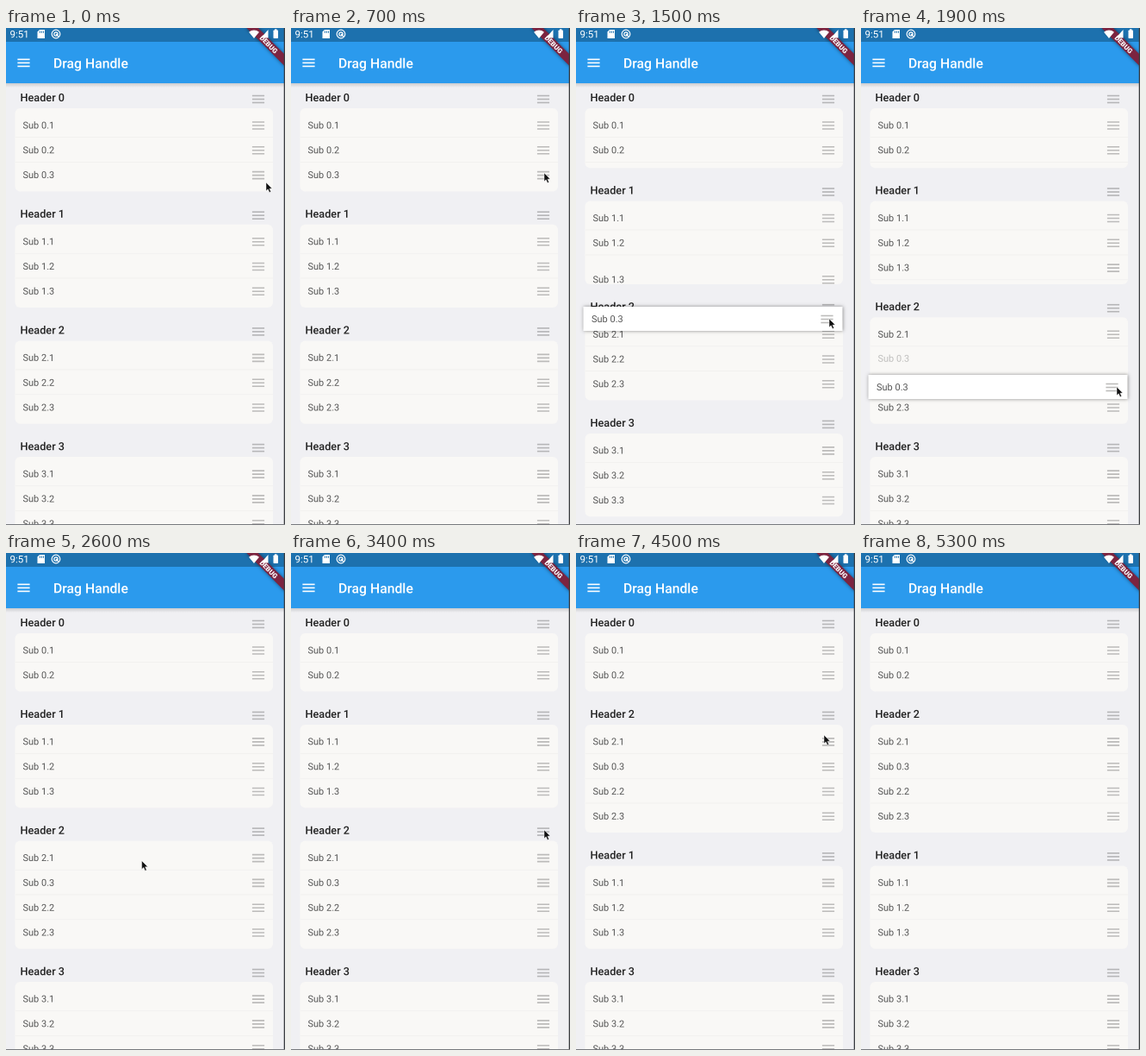
Recreate the animation shown at these times as an HTML page with a canvas. Size 324 by 576 pixels, loop 5600 ms.

```html
<!DOCTYPE html>
<html lang="en">
<head>
<meta charset="utf-8">
<title>Drag Handle</title>
<style>
html, body { margin: 0; width: 100%; height: 100%; overflow: hidden; background: #f0f0f3; }
canvas { display: block; width: 324px; height: 576px; }
</style>
</head>
<body>
<canvas id="stage"></canvas>
<script>
const W = 324, H = 576, LOOP = 5600, TICK = 100;
const ROW = 28.8, DIVIDER = 1.6, GAP = ROW - DIVIDER, FRAME = 48.3;
const canvas = document.getElementById('stage');
const g = canvas.getContext('2d');
const dpr = window.devicePixelRatio || 1;
canvas.width = W * dpr;
canvas.height = H * dpr;

const ramp = (t, start, length) => Math.min(1, Math.max(0, (t - start) / length));

// Pointer moves: start, end, x, y. Dragged things follow the pointer.
const MOVES = [
  [300, 700, 294, 168], [900, 1500, 294, 337], [1500, 1900, 297, 416],
  [2200, 2800, 88, 327], [2800, 3400, 294, 321], [3600, 4000, 290, 223],
  [4000, 4200, 288, 211], [4700, 4900, 165, 131], [5000, 5200, 27, 6]
];

function pointer(t) {
  let x = 302, y = 179;
  for (const [start, end, toX, toY] of MOVES) {
    const p = ramp(t, start, end - start);
    x += (toX - x) * p;
    y += (toY - y) * p;
  }
  return { x, y };
}

// Times at which the dragged row enters each drop slot; the last slot closes behind it.
const SLOTS = [0, 900, 1033, 1233, 1400, 1500, 1633, LOOP];
const slotGap = (t, i) => GAP * (ramp(t, SLOTS[i], 200) - ramp(t, SLOTS[i + 1], 200));

function rect(x, y, w, h, color, r = 0) {
  g.fillStyle = color;
  g.beginPath();
  g.roundRect(x, y, w, h, r);
  g.fill();
}

function poly(color, ...pts) {
  g.fillStyle = color;
  g.beginPath();
  pts.forEach(p => g.lineTo(...p));
  g.closePath();
  g.fill();
}

function text(s, x, y, size, color, weight = 400) {
  g.save();
  g.translate(x, y + size * 0.36);
  g.transform(1, 5e-4, 0, 1, 0, 0); // a hair of skew allows fractional baselines
  g.font = `${weight} ${size}px Roboto, sans-serif`;
  g.fillStyle = color;
  g.fillText(s, 0, 0);
  g.restore();
}

function bars(x, y, color) {
  for (const d of [-4, 0, 4]) rect(x - 7.1, y + d - 0.8, 14.2, 1.6, color);
}

function faded(draw) {
  g.save();
  g.globalAlpha = 0.35;
  draw();
  g.restore();
}

function row(name, x, y, handle = true) {
  text(name, x + 19.5, y, 11, '#555');
  if (handle) bars(x + 293, y + 0.5, '#bcbbba');
}

const sub = (n, count = 3) => Array.from({ length: count }, (_, i) => `Sub ${n}.${i + 1}`);
const sum = rows => rows.reduce((s, r) => s + (typeof r === 'number' ? r : ROW), 0);
const height = rows => FRAME + sum(rows);

function header(n, x, y) {
  text('Header ' + n, x + 16.5, y, 12.7, '#222', 500);
}

function panel(rows, x, y) {
  rect(x + 10.5, y + 12.5, 299.5, sum(rows) + 10, '#f9f8f6', 6);
}

// Rows are names; a number is an open gap of that height.
function list([n, rows], x, y) {
  header(n, x, y);
  bars(x + 293, y + 2, '#b5b5b7');
  g.save();
  panel(rows, x, y);
  g.clip();
  let top = y + 32 - ROW / 2;
  rows.forEach((r, i) => {
    if (typeof r === 'number') {
      if (r > GAP - 1) faded(() => row('Sub 0.3', x, top + r / 2, false));
      top += r;
    } else {
      row(r, x, top + ROW / 2);
      top += ROW;
      if (i < rows.length - 1) rect(x + 10.5, top - 0.8, 299.5, 1, '#f2f1ef');
    }
  });
  g.restore();
}

// Items are lists; a number is space opened for the dragged list.
function stack(...items) {
  let y = 80.5;
  for (const it of items) {
    if (typeof it === 'number') {
      if (it > 130) faded(() => { header(2, 0, y); panel(merged[1], 0, y); });
      y += it;
    } else {
      list(it, 0, y);
      y += height(it[1]);
    }
  }
}

const full = n => [n, sub(n)];
const short = [0, sub(0, 2)];
const merged = [2, ['Sub 2.1', 'Sub 0.3', 'Sub 2.2', 'Sub 2.3']];

function dragRow(t) {
  const { y } = pointer(t);
  const [end0, end1, mid, low, , top2, mid2] = SLOTS.map((_, i) => slotGap(t, i));
  const left = y > 320; // the panel shrinks at once when the row leaves it
  stack(
    [0, [...sub(0, 2), DIVIDER + end0]],
    [1, ['Sub 1.1', mid, 'Sub 1.2', low, 'Sub 1.3', left ? -low : end1]],
    [2, [top2, 'Sub 2.1', mid2, 'Sub 2.2', 'Sub 2.3']],
    full(3), full(4)
  );
  g.save();
  g.shadowColor = 'rgba(0,0,0,.45)';
  g.shadowBlur = 4 * dpr;
  rect(8.5, y - 14, 301, 28, '#fff');
  g.restore();
  row('Sub 0.3', -1.5, y);
}

function dragList(t) {
  const y = pointer(t).y - 5, space = height(merged[1]);
  const gap = space * ramp(t, 3730, 300);
  stack(short, gap, full(1), space - gap, full(3));
  rect(8.5, y - 16, 300, 34, '#f3f3f2');
  rect(284.5, y - 6, 14, 13, '#e6e6e6');
  list(merged, -1.5, y);
}

function content(t) {
  if (t < 1000) stack(...[0, 1, 2, 3].map(full));
  else if (t < 2300) dragRow(t);
  else if (t < 3700) stack(short, full(1), merged, full(3));
  else if (t < 4400) dragList(t);
  else stack(short, merged, full(1), full(3));
}

function ribbon() {
  g.save();
  g.translate(W, 0);
  g.rotate(Math.PI / 4);
  g.shadowColor = 'rgba(0,0,0,.5)';
  g.shadowBlur = 4 * dpr;
  rect(-31.5, 22, 63, 9.5, '#7c2440');
  g.shadowBlur = 0;
  g.textAlign = 'center';
  text('DEBUG', 0, 26.8, 8, '#fff', 900);
  g.restore();
}

function statusIcons() {
  text('9:51', 4.5, 7, 11.6, '#fff');
  poly('#fff', [39, 2], [45, 2], [45, 12], [36.5, 12], [36.5, 4.5]);
  for (const x of [39, 41, 43]) rect(x, 3.5, 1, 2.2, '#1d71ae');
  g.strokeStyle = '#fff';
  g.lineWidth = 1.2;
  g.beginPath();
  g.arc(58, 7, 4.8, 0, 7);
  g.moveTo(60.2, 7);
  g.arc(58, 7, 2.2, 0, 7);
  g.moveTo(58, 7);
  g.lineTo(61.5, 10.5);
  g.stroke();
  g.fillStyle = '#fff';
  g.beginPath();
  g.moveTo(288, 12);
  g.arc(288, 11.5, 9, -Math.PI * 0.73, -Math.PI * 0.27);
  g.fill();
  poly('#fff', [304.5, 2], [304.5, 11.5], [296, 11.5]);
  rect(310.5, 2.5, 5.5, 9.5, '#fff', 0.8);
  rect(312, 1.3, 2.5, 2, '#fff');
}

function chrome() {
  const shade = g.createLinearGradient(0, 64, 0, 69);
  shade.addColorStop(0, 'rgba(0,0,0,.15)');
  shade.addColorStop(1, 'rgba(0,0,0,0)');
  rect(0, 64, W, 5, shade);
  rect(0, 0, W, 64, '#2b9aed');
  rect(0, 0, W, 16, '#1d71ae');
  bars(20.5, 40.4, '#fff');
  text('Drag Handle', 55, 40.7, 15.75, '#fff', 500);
  ribbon();
  statusIcons();
  rect(322.7, 0, 1.3, H, '#3a3c40');
  rect(0, 575, W, 1, '#77797d');
}

function cursor(t) {
  if (t >= 5300) return;
  const { x, y } = pointer(t);
  g.save();
  g.translate(x, y);
  poly('#111', [0, 0], [0, 9.8], [2.2, 7.8], [3.9, 11.6], [5.6, 10.8], [4, 7.2], [7, 7]);
  g.strokeStyle = 'rgba(255,255,255,.75)';
  g.lineWidth = 0.6;
  g.stroke();
  g.restore();
}

const start = performance.now();

function frame() {
  const t = Math.floor((performance.now() - start) % LOOP / TICK) * TICK;
  g.setTransform(dpr, 0, 0, dpr, 0, 0);
  rect(0, 0, W, H, '#f0f0f3');
  content(t);
  chrome();
  cursor(t);
  requestAnimationFrame(frame);
}
frame();
</script>
</body>
</html>
```
